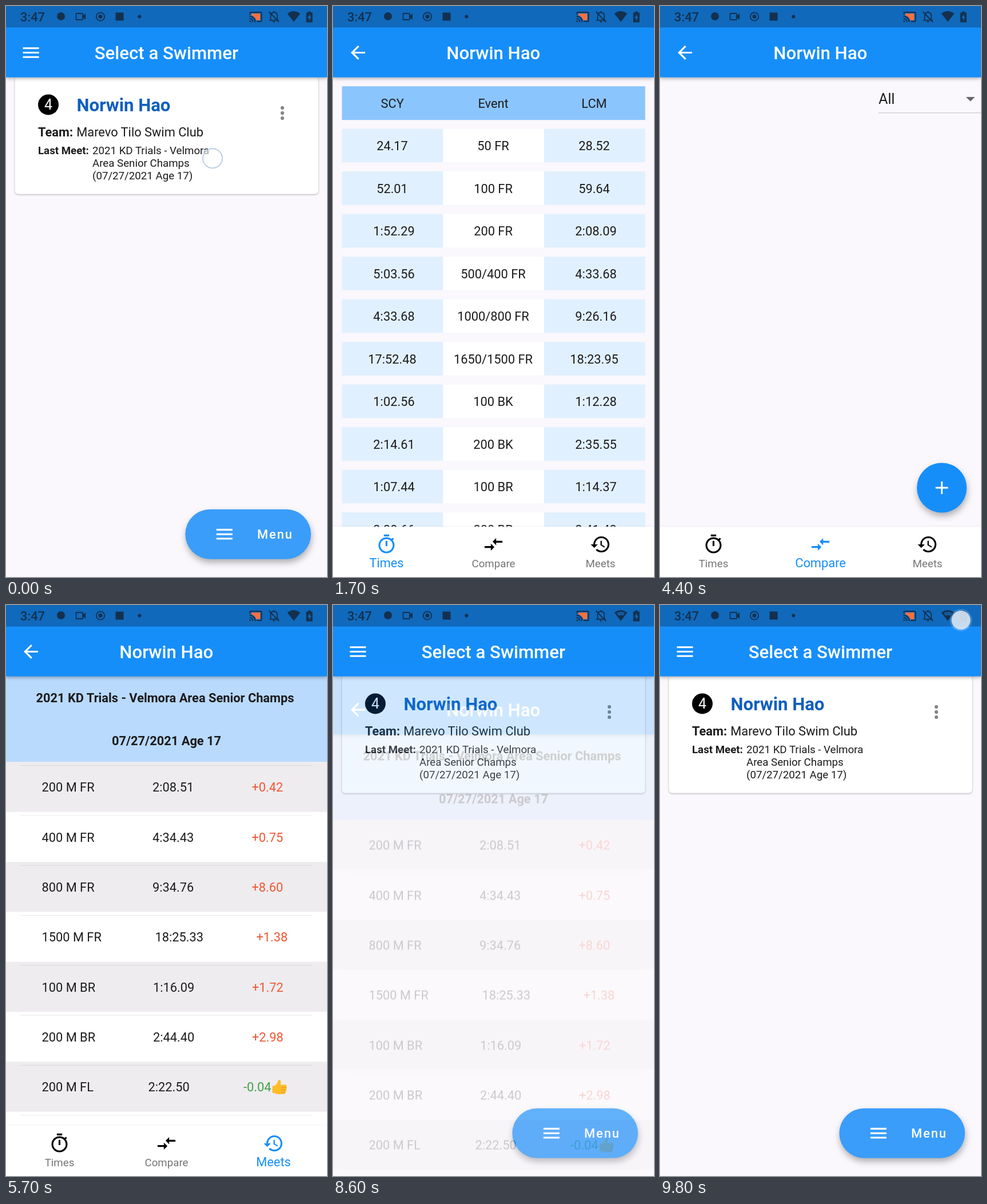
Animation, 561 px wide and 998 px high, one loop 9900 ms. Source, as an HTML page:

```html
<!DOCTYPE html>
<html lang="en">
<head>
<meta charset="utf-8">
<title>Swim times</title>
<style>
  html, body { margin: 0; width: 100%; height: 100%; overflow: hidden; background: #faf8fc; }
  svg { display: block; width: 561px; height: 998px; font-family: Roboto, sans-serif; }
  text { white-space: pre; }
  .mid { text-anchor: middle; }
  .soft { filter: drop-shadow(0 1px 1.5px rgba(0,0,0,.3)); }
  .bar { filter: drop-shadow(0 2px 3px rgba(0,0,0,.32)); }
  .fab { filter: drop-shadow(1px 6px 6px rgba(0,0,0,.3)); }
  .nav { filter: drop-shadow(0 -1px 1px rgba(0,0,0,.05)); }

  .timed { opacity: 0; animation: 9.9s step-end infinite; }
  #times { animation-name: times; }
  #compare { animation-name: compare; }
  #meets { animation-name: meets; }
  #weak { animation-name: weak; }
  #tap1 { animation-name: tap1; }
  #tap2 { animation-name: tap2; }
  #tap3 { animation-name: tap3; }
  #tap4 { animation-name: tap4; }

  @keyframes times { 0% { opacity: 0 } 17.17% { opacity: 1 } 44.44%, 100% { opacity: 0 } }
  @keyframes compare { 0% { opacity: 0 } 44.44% { opacity: 1 } 57.57%, 100% { opacity: 0 } }
  /* the page drops and fades away when leaving */
  @keyframes meets {
    0% { opacity: 0; transform: none }
    57.57% { opacity: 1; transform: none }
    86.86% { opacity: .21; transform: translateY(101.5px) }
    87.87% { opacity: .01; transform: translateY(246px) }
    88.88%, 100% { opacity: 0; transform: none }
  }
  @keyframes weak { 0% { opacity: 0 } 70.7%, 100% { opacity: .75 } }
  @keyframes tap1 { 0% { opacity: 1 } 1.01%, 100% { opacity: 0 } }
  @keyframes tap2 { 0% { opacity: 0 } 35.35% { opacity: 1 } 37.37% { opacity: .5 } 38.38%, 100% { opacity: 0 } }
  @keyframes tap3 { 0% { opacity: 0 } 48.48% { opacity: 1 } 51.51% { opacity: .5 } 52.52%, 100% { opacity: 0 } }
  @keyframes tap4 { 0% { opacity: 0 } 98.98%, 100% { opacity: 1 } }
</style>
</head>
<body>
<svg id="stage" viewBox="0 0 561 998"></svg>
<script>
const BLUE = '#168efa', INK = '#1b1b1d', DARK = '#14304d';
const SWIMMER = 'Norwin Hao';
const MEET = ['2021 KD Trials - Velmora', 'Area Senior Champs'];

const ICONS = {
  menu: 'M3 18h18v-2H3v2zm0-5h18v-2H3v2zm0-7v2h18V6H3z',
  back: 'M20 11H7.83l5.59-5.59L12 4l-8 8 8 8 1.41-1.41L7.83 13H20v-2z',
  times: 'M15 1H9v2h6V1zm-4 13h2V8h-2v6zm8.03-6.61l1.42-1.42c-.43-.51-.9-.99-1.41-1.41l-1.42 1.42C16.07 4.74 14.12 4 12 4c-4.97 0-9 4.03-9 9s4.02 9 9 9 9-4.03 9-9c0-2.12-.74-4.07-1.97-5.61zM12 20c-3.87 0-7-3.13-7-7s3.13-7 7-7 7 3.13 7 7-3.13 7-7 7z',
  compare: 'M9.01 14H2v2h7.01v3L13 15l-3.99-4v3zm5.98-1v-3H22V8h-7.01V5L11 9l3.99 4z',
  meets: 'M13 3c-4.97 0-9 4.03-9 9H1l3.89 3.89.07.14L9 12H6c0-3.87 3.13-7 7-7s7 3.13 7 7-3.13 7-7 7c-1.93 0-3.68-.79-4.94-2.06l-1.42 1.42C8.27 19.99 10.51 21 13 21c4.97 0 9-4.03 9-9s-4.03-9-9-9zm-1 5v5l4.28 2.54.72-1.21-3.5-2.08V8H12z'
};

const text = (x, y, size, str, fill = INK, attrs = '') =>
  `<text x="${x}" y="${y}" font-size="${size}" fill="${fill}" ${attrs}>${str}</text>`;
const mid = (x, y, size, str, fill, attrs = '') =>
  text(x, y, size, str, fill, 'class="mid" ' + attrs);
const rect = (x, y, w, h, fill, attrs = '') =>
  `<rect x="${x}" y="${y}" width="${w}" height="${h}" fill="${fill}" ${attrs}/>`;
const circle = (x, y, r, fill, attrs = '') =>
  `<circle cx="${x}" cy="${y}" r="${r}" fill="${fill}" ${attrs}/>`;
const path = (d, fill, attrs = '') => `<path d="${d}" fill="${fill}" ${attrs}/>`;
const icon = (name, cx, cy, fill) =>
  path(ICONS[name], fill, `transform="translate(${cx - 18.7} ${cy - 18.7}) scale(1.558)"`);
const BOLD = 'font-weight="700"', MEDIUM = 'font-weight="500"';

const header = (lead, title) =>
  rect(0, 0, 561, 124.7, BLUE, 'class="bar"') + icon(lead, 43.6, 81.5, '#fff') +
  mid(280.3, 93, 31.17, title, '#fff', MEDIUM);

function nav(active) {
  const tabs = ['Times', 'Compare', 'Meets'].map((label, i) => {
    const on = i === active, x = 93.5 + 187 * i;
    return icon(label.toLowerCase(), x, 941, on ? BLUE : '#000') +
      mid(x, 981.2, on ? 21.8 : 18.7, label, on ? BLUE : '#757575');
  });
  return rect(0, 910, 561, 88, '#fff', 'class="nav"') + tabs.join('');
}

const page = (id, body, tab) =>
  `<g id="${id}" class="timed">${rect(0, 0, 561, 998, '#faf8fc')}${body}` +
  header('back', SWIMMER) + nav(tab) + '</g>';

function home() {
  const dots = [178, 187, 196].map(y => circle(483, y, 3.1, '#868588')).join('');
  return rect(0, 0, 561, 998, '#faf8fc') +
    rect(15.6, 122, 530, 206.7, '#fff', 'rx="6" class="soft"') +
    circle(74, 172.4, 18, '#000') + mid(74, 181.4, 24.9, '4', '#fff') +
    text(123.5, 184, 31.17, SWIMMER, '#0e5fc0', BOLD) + dots +
    text(56, 228, 21.8, 'Team:', INK, BOLD) +
    text(123.3, 228, 21.8, 'Marevo Tilo Swim Club') +
    text(56, 259, 18.7, 'Last Meet:', INK, BOLD) +
    [...MEET, '(07/27/2021 Age 17)'].map((s, i) => text(151, 259 + 22 * i, 18.7, s)).join('') +
    rect(313.3, 879.7, 219.7, 87, '#3a9dfa', 'rx="43.5" class="fab"') +
    icon('menu', 381.8, 923.2, '#fff') +
    text(439, 931, 21.8, 'Menu', '#fff', MEDIUM + ' letter-spacing="1.95"') +
    header('menu', 'Select a Swimmer');
}

function timesTable() {
  const rows = `24.17|50 FR|28.52
52.01|100 FR|59.64
1:52.29|200 FR|2:08.09
5:03.56|500/400 FR|4:33.68
4:33.68|1000/800 FR|9:26.16
17:52.48|1650/1500 FR|18:23.95
1:02.56|100 BK|1:12.28
2:14.61|200 BK|2:35.55
1:07.44|100 BR|1:14.37
2:38.66|200 BR|2:41.43`.split('\n').map(r => r.split('|'));
  let out = rect(15.6, 140.3, 530, 58.9, '#8bc5fd');
  ['SCY', 'Event', 'LCM'].forEach((s, c) => out += mid(103.7 + 176.4 * c, 178, 21.8, s));
  rows.forEach((cells, i) => {
    const y = 214.6 + 74.5 * i;
    out += rect(15.6, y, 530, 58.7, '#e1f0fe') + rect(192.3, y, 176.6, 58.7, '#fff');
    cells.forEach((s, c) => {
      const shift = /^\d:/.test(s) ? 3 : 0;
      out += mid(103.5 + 176.5 * c + shift, y + 37.8, 21.8, s);
    });
  });
  return out;
}

const comparePanel = () =>
  text(382, 171, 24.9, 'All') + path('M534.7 159h15.6l-7.8 7.8z', '#68676a') +
  rect(381.5, 186.2, 180, 1.2, '#cbc9cd') +
  circle(492.5, 842, 43.6, BLUE, 'class="fab"') +
  path('M481.6 842h21.8M492.5 831.1v21.8', 'none', 'stroke="#fff" stroke-width="3.1"');

const thumb = () =>
  path('M465.5 842.5q0-2 2-2.2l3.2-.4q3.6-3 4.6-7.6 .5-3 3-2.2 3.400 1.400 1.500 8.400h8.200q2.600.2 2.300 2.500 1 2 -.2 3.500 .8 2.300-.7 3.700 .4 2.200-1.200 3.300 0 3.500-3.400 3.600h-9.500q-3.500-.2-5.800-2l-2-.2q-2 0-2-2z', '#fcbc27') +
  path('M481 843.500h8.800M481 847.500h8.300M481 851.500h7.300', 'none', 'stroke="#e59618" stroke-width="1"');

function meetList() {
  const rows = `200 M FR|2:08.51|+0.42|256|429.5
400 M FR|4:34.43|+0.75|256|429.5
800 M FR|9:34.76|+8.60|256|429.5
1500 M FR|18:25.33|+1.38|260.5|437.5
100 M BR|1:16.09|+1.72|257|430
200 M BR|2:44.40|+2.98|257|430
200 M FL|2:22.50|-0.04|248.5|415`.split('\n').map(r => r.split('|'));
  let out = rect(0, 124, 561, 874, '#fff') + rect(0, 124, 561, 150.3, '#b9dafd') +
    mid(278, 170, 21.8, MEET.join(' '), INK, BOLD) +
    mid(280.5, 245, 21.8, '07/27/2021 Age 17', INK, BOLD);
  rows.forEach(([event, time, diff, tx, dx], i) => {
    const y = 274.3 + 87.33 * i;
    if (i % 2 === 0) out += rect(0, y, 561, 87.3, '#eeecef');
    out += rect(25, y + 5.7, 511, 1.2, 'rgba(0,0,0,.08)') +
      text(62.5, y + 52, 21.8, event) + text(tx, y + 52, 21.8, time) +
      text(dx, y + 52, 21.8, diff, diff[0] === '-' ? '#43a047' : '#ee5733');
  });
  return out + rect(25, 891.3, 511, 1.2, 'rgba(0,0,0,.08)') + thumb();
}

function statusBar() {
  const line = `stroke="${DARK}" stroke-width="1.8"`;
  return rect(0, 0, 561, 37.5, '#1069bb') +
    text(25, 27, 21.8, '3:47', DARK, MEDIUM) +
    circle(96, 18, 7, DARK) +
    rect(122.5, 13, 11.5, 11, 'none', line + ' rx="1"') + path('M134 17l5-4v11l-5-4z', DARK) +
    circle(165, 18.5, 7.2, 'none', line) + circle(165, 18.5, 3.4, DARK) +
    rect(191.5, 11.5, 14, 14, DARK) + circle(233.3, 18.6, 3, DARK) +
    `<g transform="translate(424.5 7)">` +
    path('M19 7H5v1.63c3.96 1.28 7.09 4.41 8.37 8.37H19z', '#f9703e', 'stroke="#f9703e" stroke-width="1.6"') +
    path('M1 18v3h3c0-1.66-1.34-3-3-3zm0-4v2c2.76 0 5 2.24 5 5h2c0-3.87-3.13-7-7-7zM1 10v2c4.97 0 9 4.03 9 9h2c0-6.08-4.93-11-11-11zm20-7H3c-1.1 0-2 .9-2 2v3h2V5h18v14h-7v2h7c1.100 0 2-.9 2-2V5c0-1.100-.9-2-2-2z', DARK) + '</g>' +
    path('M462.500 24.500v-7.500q0-5.500 5.800-6 5.800.5 5.800 6v7.500M460 24.800h16.500M468.300 11v-2M459.500 10l17.500 18', 'none', line) +
    path('M466 26.500h4.600q-.4 2.300-2.300 2.300t-2.300-2.300z', DARK) +
    path('M491.700 13.300q11.300-8.600 22.600 0L503 27.800z', DARK) +
    path('M495.500 14q7.500-4.500 15 0l-4 5q-3.500-2.500-7 0z', '#1069bb', 'id="weak" class="timed"') +
    path('M528 9.500h4.500v2h3.200v17h-11v-17h3.300z', DARK) +
    path('M531.300 14l-4.300 6.700h2.700v5.300l4-7h-2.400z', '#1069bb');
}

const tap = (id, x, y) => circle(x, y, 17, 'rgba(255,255,255,.6)',
  `id="${id}" class="timed" stroke="#bcd1e4" stroke-width="2"`);

document.getElementById('stage').innerHTML =
  home() +
  page('times', timesTable(), 0) +
  page('compare', comparePanel(), 1) +
  page('meets', meetList(), 2) +
  statusBar() +
  tap('tap1', 361, 266.3) + tap('tap2', 334, 974) + tap('tap3', 511, 973) +
  '<g id="tap4" class="timed">' +
  circle(526, 26.5, 19.5, 'rgba(190,220,250,.25)') +
  circle(526, 26.5, 16.5, 'rgba(222,233,244,.86)') + '</g>';
</script>
</body>
</html>
```
